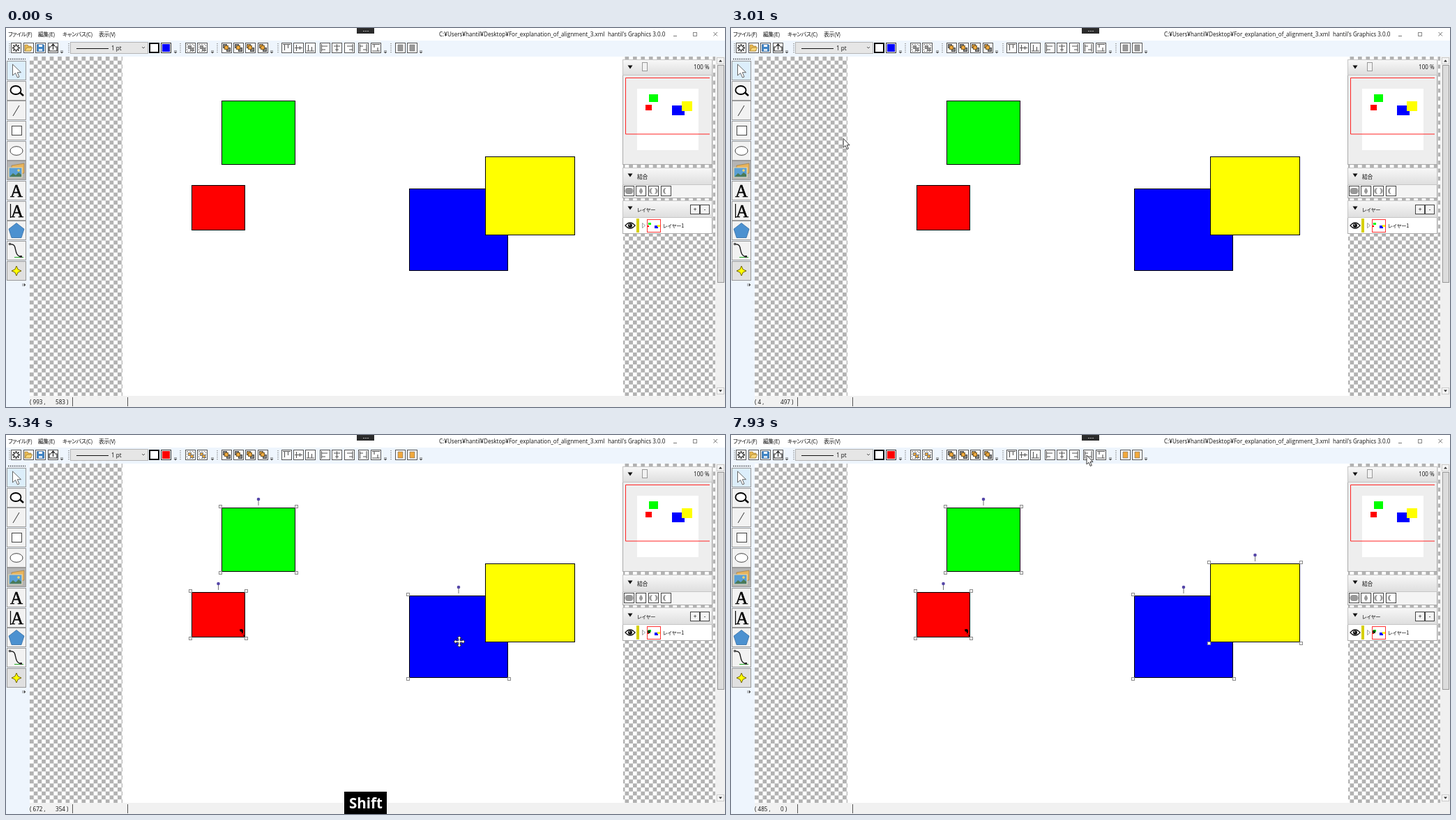
An HTML page that plays this animation: 1031x543 px, repeating every 8000 ms.

```html
<!DOCTYPE html>
<html lang="ja">
<head>
<meta charset="utf-8">
<title>Drawing editor</title>
<style>
html, body { margin: 0; width: 100%; height: 100%; overflow: hidden; background: #fff; }
svg { display: block; width: 100vw; height: 100vh; }
text { font: 8.1px "Open Sans", "Noto Sans CJK JP", sans-serif; fill: #111; }
.jp { font: 7.9px "Noto Sans CJK JP", "Noto Sans CJK", sans-serif; font-feature-settings: "palt"; letter-spacing: -.35px; }
.kana { font-size: 7.3px; letter-spacing: -.1px; }
.serif { font: 25px "Liberation Serif", serif; fill: #000; stroke: #000; stroke-width: .5px; }
.key { font: 700 20.5px "Open Sans", sans-serif; fill: #fff; }
rect { shape-rendering: crispEdges; }
.op, .join { fill: #999; }
.op.on { fill: #f2a83c; }
.join.on { fill: #f22; }
</style>
</head>
<body>
<svg id="stage" viewBox="0 0 1031 543"></svg>
<script>
const rect = (x, y, w, h, fill, stroke, more = '') => stroke
  ? `<rect x="${x + .5}" y="${y + .5}" width="${w - 1}" height="${h - 1}" fill="${fill}" stroke="${stroke}" ${more}/>`
  : `<rect x="${x}" y="${y}" width="${w}" height="${h}" fill="${fill}" ${more}/>`;
const path = (d, fill = 'none', stroke = 'none', width = 1, more = '') =>
  `<path d="${d}" fill="${fill}" stroke="${stroke}" stroke-width="${width}" ${more}/>`;
const circle = (x, y, r, fill, stroke = 'none') =>
  `<circle cx="${x}" cy="${y}" r="${r}" fill="${fill}" stroke="${stroke}"/>`;
const text = (x, y, s, cls = '', more = '') => `<text x="${x}" y="${y}" class="${cls}" ${more}>${s}</text>`;
const group = (attrs, ...parts) => `<g ${attrs}>${parts.join('')}</g>`;
const at = (x, y, ...parts) => group(`transform="translate(${x} ${y})"`, ...parts);

const shapes = [
  { name: 'red', x: 266, y: 225, w: 77, h: 65, fill: '#f00', since: 3500 },
  { name: 'green', x: 309, y: 104, w: 106, h: 92, fill: '#0f0', since: 4320 },
  { name: 'blue', x: 578, y: 230, w: 142, h: 118, fill: '#00f', since: 5340 },
  { name: 'yellow', x: 687, y: 184, w: 129, h: 113, fill: '#ff0', since: 5750 }
];

function drawShape({ name, x, y, w, h, fill }) {
  const mid = x + w / 2, corners = [];
  for (const cx of [x - 4, x + w - 1])
    for (const cy of [y - 4, y + h - 1]) corners.push(rect(cx, cy, 5, 5, '#fff', '#8a8a8a'));
  return rect(x, y, w, h, fill, '#000') + group(`id="${name}"`, ...corners,
    path(`M${mid} ${y - 3}V${y - 10}`, 'none', '#777'), circle(mid, y - 12, 2.3, '#5546a8'));
}

const miniature = (x, y, k) => group(`transform="translate(${x} ${y}) scale(${k})"`,
  ...shapes.map(s => rect(s.x, s.y, s.w, s.h, s.fill)));

function toolbar() {
  const box = x => rect(x - 7, 21, 15, 15, '#fdfdfd', '#555');
  const grip = x => path(`M${x} 22V36`, 'none', '#777', 1.2, 'stroke-dasharray="1.2 1.8"');
  const overflow = x => path(`M${x - 2} 32.5h4M${x - 2} 34.2h4l-2 2z`, '#444', '#444', .5);
  const icon = (x, ...parts) => box(x) + at(x, 28, ...parts);
  let s = rect(0, 18, 1031, 23, '#eef5fd');
  s += [5, 90, 250, 303, 390, 552].map(grip).join('') + [80, 243, 296, 381, 544, 595].map(overflow).join('');
  s += icon(14, circle(.5, .5, 3, 'none', '#222'),
    path('M.5 -5v2M.5 6v-2M-5 .5h2M6 .5h-2M-3.4 -3.4l1.5 1.5M4.4 4.4l-1.5 -1.5M4.4 -3.4l-1.5 1.5M-3.4 4.4l1.5 -1.5', 'none', '#222', 1.8));
  s += icon(32, path('M-5 5V-4h4l1 2h4v7z', '#e9b950', '#8f6a1f', .6), path('M-5 5l3 -5h8l-3 5z', '#f8d678', '#8f6a1f', .6));
  s += icon(49, path('M-4.5 -4.5h9l1 1v9h-10z', '#3d83c5', '#1d4c80', .6), rect(-2, -4, 5, 3, '#fff'), rect(-2, 2, 5, 3, '#dce8f4'));
  s += icon(67, path('M-2 -1h-3v6h11v-6h-3M.5 3v-7M-2 -2l2.5 -3l2.5 3', 'none', '#222', 1.2));
  s += rect(92, 20, 112, 17, '#e6e6e6', '#b5b5b5') + path('M101 29.5H147', 'none', '#111') + text(151, 32, '1 pt')
    + path('M195 27l2 2l2 -2', 'none', '#444', .9);
  s += rect(205, 21, 15, 15, '#000') + rect(207, 23, 11, 11, '#fff');
  s += rect(222, 21, 15, 15, '#fff', '#333') + rect(224, 23, 11, 11, '#00f', 0, 'id="swatch"');
  const dashes = path('M-4.5 -4.5h10v10h-10z', 'none', '#666', .8, 'stroke-dasharray="2 1.5"');
  for (const x of [264, 281])
    s += icon(x, dashes, group('class="op"', rect(-3, -3, 5, 5, 'inherit', '#777'), rect(0, 0, 5, 5, 'inherit', '#777')));
  [316, 333, 350, 368].forEach((x, i) => {
    const back = rect(-5, -5, 6, 6, i < 2 ? '#888' : '#f0aa40', '#444'), front = rect(0, 0, 6, 6, '#888', '#444');
    const mid = rect(-3, -3, 6, 6, '#f0aa40', '#7a5a20');
    s += icon(x, back, front, mid);
  });
  const aligns = [
    'M-5 -4.5h11M-2.5 -4v8M2.5 -4v5', 'M-5 .5h11M-2.5 -4v9M2.5 -2v5', 'M-5 5h11M-2.5 -4v9M2.5 -1v6',
    'M-4.5 -5v11M-4 -2h8M-4 3h5', 'M.5 -5v11M-4 -2h9M-2 3h5', 'M5 -5v11M5 -2h-8M5 3h-5',
    'M-4.5 -5v11M5 -5v11M-4 -2h4M0 3h5', 'M-5 -4.5h11M-5 5h11M-2 -4v4M3 0v5'
  ];
  [402, 419, 436, 457, 474, 492, 512, 530].forEach((x, i) => s += icon(x, path(aligns[i], 'none', '#555', 1.1)));
  for (const x of [565, 582]) s += icon(x, group('class="op"', path('M-3 -4h7v9h-7z', 'inherit', '#777', .7)));
  return s;
}

function toolbox() {
  const tops = [47, 76, 104, 133, 162, 190, 219, 248, 276, 305, 334];
  const fills = { 0: '#dceefb', 5: '#b4b4b4', 10: '#e0e0e0' };
  let s = rect(0, 41, 34, 502, '#eef5fd') + path('M3 44.5H28', 'none', '#444', 1.5, 'stroke-dasharray="1.5 1.5"');
  tops.forEach((y, i) => s += rect(1, y, 28, 28, fills[i] || '#f2f2f2', '#999', `id="tool${i}"`));
  s += at(9.5, 52, path('M0 0V16L4 12.5L7 19L9.5 18L6.8 11.7H12Z', '#fff', '#555', .9));
  s += path('M20.5 93l4.5 4', 'none', '#000', 2.5) + `<ellipse cx="14" cy="89" rx="7.5" ry="6" fill="#fff" stroke="#000" stroke-width="1.8"/>`;
  s += path('M10 126L19 111', 'none', '#333') + rect(8, 140, 15, 14, '#fff', '#444');
  s += `<ellipse cx="15" cy="176" rx="9" ry="6.3" fill="#fff" stroke="#444"/>`;
  s += path('M8 197l18 -3v14l-18 3z', '#e8b45c', '#94713a', .6) + path('M4 200h19v14h-19z', '#5a9fd4', '#ead9b0', 1.2)
    + path('M5 213l5 -5l4 3l4 -4l4 3v3z', '#4a7a58') + circle(18, 204, 1.8, '#f5d56a');
  s += text(15, 242, 'A', 'serif', 'text-anchor="middle"') + text(16, 270.5, 'A', 'serif', 'text-anchor="middle"')
    + path('M6.5 252V272', 'none', '#000', 1.2);
  s += path('M15 279.5L26 288L22 300.5H8L4 288Z', '#4c91d0', '#346ea5', .8);
  s += path('M6 310C18 308 9 326 22 328', 'none', '#111', 1.3) + path('M12 328.5H25', 'none', '#2a2', 1)
    + rect(4, 308, 3, 3, '#fff', '#333') + rect(20, 326, 3, 3, '#333');
  s += path('M15 341l2.2 4.8l4.8 2.2l-4.8 2.2l-2.2 4.8l-2.2 -4.8l-4.8 -2.2l4.8 -2.2z', '#ff0', '#665500', .9);
  return s + path('M24 366v4M26 366v4l2 -2z', '#444', '#444', .6);
}

function panels() {
  const head = (y, h) => rect(884, y, 129, h, 'url(#shade)', '#c6c6c6') + path(`M891.5 ${y + 8.5}h7l-3.5 5z`, '#111');
  const small = (x, s) => rect(x, 253, 14, 14, '#f4f4f4', '#444') + text(x + 7, 263, s, '', 'text-anchor="middle"');
  let s = rect(884, 45, 129, 151, '#eee', '#aaa') + head(45, 23) + rect(912, 49, 8, 13, '#f2f2f2', '#999') + text(986, 59, '100 %');
  s += rect(905, 87, 88, 88, '#fff') + miniature(884.3, 82.4, .1227) + path('M1009 71.5H888.5V152H1009', 'none', '#f22');
  s += rect(884, 200, 129, 44, '#f4f4f4', '#aaa') + head(200, 25) + text(905, 215.5, '結合', 'jp');
  const joins = ['M-1.5 -4.5a4.5 4.5 0 0 0 0 9h3a4.5 4.5 0 0 0 0 -9z', 'M0 -4.5q5 4.5 0 9q-5 -4.5 0 -9',
    'M-1.5 -4.5a4.5 4.5 0 0 0 0 9a6.5 6.5 0 0 1 0 -9M1.5 -4.5a4.5 4.5 0 0 1 0 9a6.5 6.5 0 0 0 0 -9', 'M0 -4.5a4.5 4.5 0 0 0 0 9a6.5 6.5 0 0 1 0 -9'];
  [894, 911, 929, 947].forEach((x, i) => s += rect(x - 8, 226, 15, 15, '#fff', '#444')
    + group('class="join"', at(x - .5, 233.5, path(joins[i], 'inherit'))));
  s += rect(884, 247, 129, 48, '#fff', '#aaa') + head(247, 25) + text(905, 263, 'レイヤー', 'jp kana') + small(981, '+') + small(995, '-');
  s += path('M888 283q7 -8 14 0q-7 8 -14 0z', '#fff', '#111', 1.3) + circle(895, 283, 3, '#111') + circle(894.2, 282, .8, '#fff');
  s += rect(904, 273, 4, 20, '#d6cf00') + path('M912.5 279.5l4 3.5l-4 3.5z', '#fff', '#888', .8);
  s += rect(919, 274, 20, 19, '#fff', '#f33') + miniature(910.5, 275.3, .034)
    + rect(920, 280, 4, 4, '#163a16', 0, 'id="mark"');
  return s + text(942, 286, 'レイヤー1', 'jp kana');
}

function windowFrame() {
  let s = text(621, 12, 'C:¥Users¥hantil¥Desktop¥For_explanation_of_alignment_3.xml') + text(863, 12, "hantil's Graphics 3.0.0");
  [[3, 'ファイル(F)'], [46, '編集(E)'], [81, 'キャンバス(C)'], [133, '表示(V)']].forEach(m => s += text(m[0], 12, m[1], 'jp'));
  s += path('M957 11.5h5M1014.5 6l5.5 5.5M1020 6l-5.5 5.5', 'none', '#777') + rect(985, 6, 6, 6, '#fff', '#888');
  s += rect(503, 0, 25, 8, '#2b2b2b') + path('M512 4.5h8', 'none', '#aaa', 1, 'stroke-dasharray="2 1"');
  s += rect(34, 41, 983, 486, 'url(#checks)') + rect(167, 41, 718, 486, '#fff');
  s += rect(1017, 41, 14, 486, '#f0f0f0') + rect(1019, 42, 11, 10, '#f4f4f4', '#ccc') + rect(1019, 515, 11, 10, '#f4f4f4', '#ccc')
    + path('M1022 48.5h5l-2.5 -3zM1022 518.5h5l-2.5 3z', '#333') + rect(1020, 53, 10, 312, '#dcdcdc', '#999');
  return s + rect(31, 527, 1000, 16, '#f1f1f1') + path('M95.5 529V542M174.5 529V542', 'none', '#555');
}

const stage = document.getElementById('stage');
stage.innerHTML = `<defs>
  <pattern id="checks" width="11.456" height="11.456" patternUnits="userSpaceOnUse" x="34" y="41">
    <path d="M0 0h11.456v11.456H0z" fill="#b2b2b2"/><path d="M0 0h5.728v11.456h5.728V5.728H0z" fill="#fff"/>
  </pattern>
  <linearGradient id="shade" x2="0" y2="1"><stop stop-color="#f8f8f8"/><stop offset="1" stop-color="#dedede"/></linearGradient>
</defs>` + rect(0, 0, 1031, 543, '#fff') + windowFrame() + toolbar() + toolbox()
  + shapes.map(drawShape).join('')
  + path('M335 278.5q4 -1.5 5 1q1 3 -2 5.5v-3q-3 0 -3 -3.5zM339 286l3 1v2z', '#000', 'none', 1, 'id="blot"')
  + panels()
  + text(34, 538.5, '', '', 'id="posX"') + text(71, 538.5, '', '', 'id="posY"')
  + group('id="shift"', rect(485, 511, 61, 32, '#000'), text(492, 535, 'Shift', 'key'))
  + group('id="pointer"', `<circle id="glow" r="9" fill="#ffe838" opacity=".65"/>`,
    path('M0 0V13L3 10.3L5.2 15.5L7.3 14.6L5.1 9.5H9Z', '#fff', '#222', .9, 'id="arrow"'),
    path('M0 -8L3 -4.5H1.2V-1.2H4.5V-3L8 0L4.5 3V1.2H1.2V4.5H3L0 8L-3 4.5H-1.2V1.2H-4.5V3L-8 0L-4.5 -3V-1.2H-1.2V-4.5H-3Z', '#fff', '#222', .9, 'id="mover"'));

const $ = id => document.getElementById(id);
const show = (id, on) => $(id).style.display = on ? '' : 'none';
const setOn = (cls, on) => document.querySelectorAll('.' + cls).forEach(e => e.classList.toggle('on', on));

// Pointer route: time, x, y
const route = [
  [740, 533, 440], [1020, 170, 398], [1230, 28, 162], [1510, 18, 88], [1580, 18, 84], [1930, 17, 61],
  [2660, 17, 61], [3430, 334, 275], [3500, 324, 272], [3770, 324, 272], [4250, 398, 169.4], [4590, 398, 169.4],
  [5340, 650, 296], [5410, 655, 294], [5750, 754.3, 263.4], [6610, 754.3, 263.4], [6890, 594, 152],
  [7090, 590, 146], [7720, 515.4, 42.2], [7860, 511, 33], [7930, 510, 29]
];
const STEP = 70;

function pointerAt(t) {
  const i = route.findLastIndex(k => k[0] <= t);
  if (i < 0) return [-50, -50];
  const [t0, x0, y0] = route[i], [t1, x1, y1] = route[i + 1] || route[i];
  const p = t1 > t0 ? Math.floor((t - t0) / STEP) * STEP / (t1 - t0) : 0;
  return [x0 + (x1 - x0) * p, y0 + (y1 - y0) * p];
}

function lastPosition(t, x, y) {
  if (x > 167.5 && x < 885 && y > 41.6) return [(x - 167.5) / .717, (y - 41.6) / .717].map(Math.floor);
  return t < 740 ? [993, 583] : t < 3500 ? [4, 497] : [485, 0];
}

function render(t) {
  const [x, y] = pointerAt(t);
  const over = shapes.findLast(s => x > s.x && x < s.x + s.w && y > s.y && y < s.y + s.h);
  const moving = !!over && t >= over.since;
  const within = (a, b) => t >= a && t < b;
  $('pointer').setAttribute('transform', `translate(${x} ${y})`);
  show('arrow', !moving);
  show('mover', moving);
  show('glow', within(2260, 2390) || within(3500, 3640) || within(4320, 4390));
  for (const s of shapes) show(s.name, t >= s.since);
  show('blot', t >= 3500);
  show('mark', t >= 3500);
  show('shift', within(4050, 7300));
  setOn('op', t >= 4320);
  setOn('join', within(4320, 5340));
  $('swatch').setAttribute('fill', t < 3500 ? '#00f' : '#f00');
  $('tool1').setAttribute('fill', x > 0 && x < 28 && y >= 76 && y < 104 ? '#dceefb' : '#f2f2f2');
  const [px, py] = lastPosition(t, x, y);
  $('posX').textContent = `( ${px} ,`;
  $('posY').textContent = `${py} )`;
}

const start = performance.now();
function tick() {
  render((performance.now() - start) % 8000);
  requestAnimationFrame(tick);
}
tick();
</script>
</body>
</html>
```
